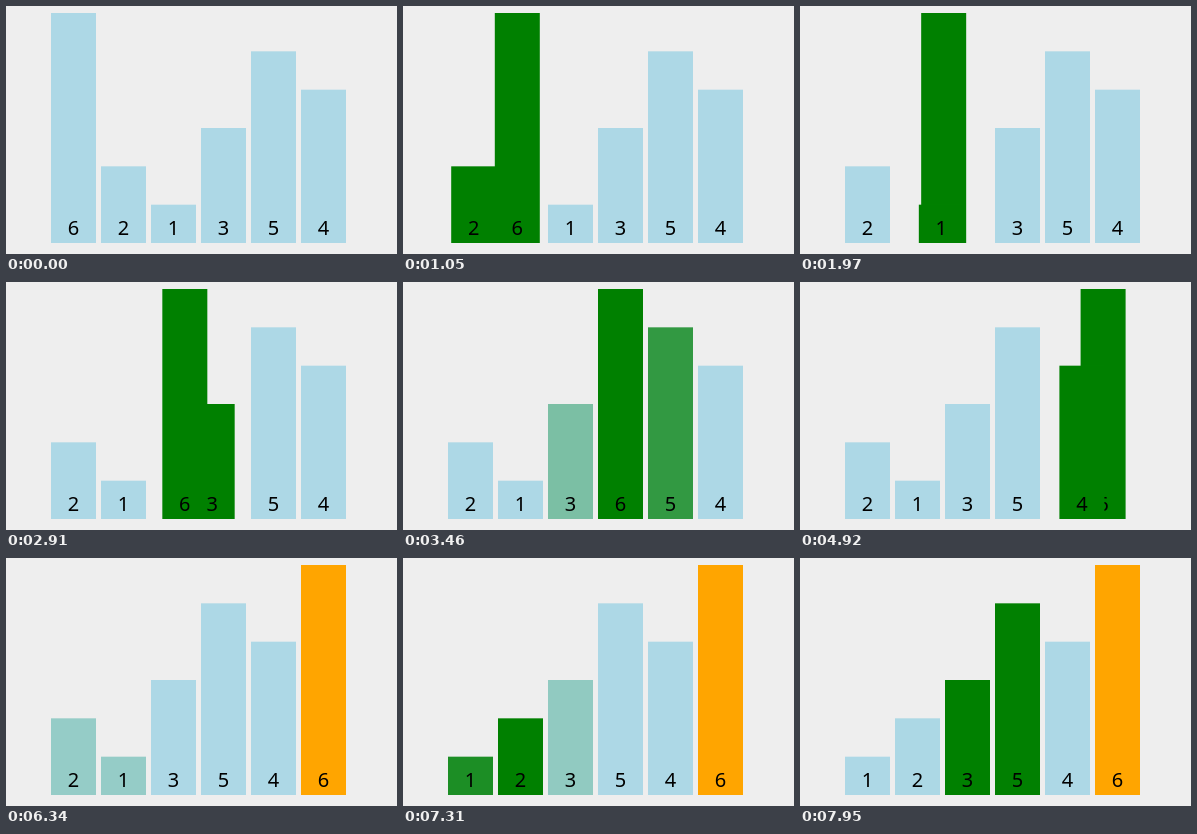
An HTML page that plays this animation: 391 px wide and 248 px high, repeating every 8000 ms.

```html
<!DOCTYPE html>
<html lang="en">
<head>
<meta charset="utf-8">
<title>Bubble sort</title>
<style>
  html, body { margin: 0; width: 100%; height: 100%; overflow: hidden; background: #eee; }
  svg { display: block; }
  text { font: 20px "Noto Sans", "Open Sans", sans-serif; text-anchor: middle; }
</style>
</head>
<body>
<svg width="391" height="248"></svg>
<script>
const LOOP = 8000, FADE = 250;
const BASE = 237, UNIT = 230 / 6, BAR_WIDTH = 45, PITCH = 50;
const IDLE = [173, 216, 230], ACTIVE = [0, 128, 0], SORTED = [255, 165, 0];

const svg = document.querySelector('svg');

function add(parent, tag, attributes) {
  const node = document.createElementNS('http://www.w3.org/2000/svg', tag);
  for (const name in attributes) node.setAttribute(name, attributes[name]);
  return parent.appendChild(node);
}

const slotX = slot => [45 + slot * PITCH];

const bars = [6, 2, 1, 3, 5, 4].map((value, slot) => {
  const group = add(svg, 'g');
  const height = value * UNIT;
  const rect = add(group, 'rect', { y: BASE - height, width: BAR_WIDTH, height });
  add(group, 'text', { x: BAR_WIDTH / 2, y: 229 }).textContent = value;
  return {
    group, rect,
    x: [{ time: -FADE, to: slotX(slot) }],
    color: [{ time: -FADE, to: IDLE }]
  };
});

// Build each bar's keys by running the sort; a step without a slot ends a pass.
const order = [...bars];
let sortedFrom = order.length;

function setColor(bar, time, to) {
  if (bar.color.at(-1).to !== to) bar.color.push({ time, to });
}

function step(time, slot, swapTime) {
  if (slot === undefined) sortedFrom--;
  order.forEach((bar, i) => {
    const active = i === slot || i === slot + 1;
    setColor(bar, time, i >= sortedFrom ? SORTED : active ? ACTIVE : IDLE);
  });
  if (swapTime === undefined) return;
  [order[slot], order[slot + 1]] = [order[slot + 1], order[slot]];
  for (const i of [slot, slot + 1]) order[i].x.push({ time: swapTime, to: slotX(i) });
}

step(370, 0, 864);
step(1354, 1, 1844);
step(2334, 2, 2815);
step(3315, 3, 3795);
step(4285, 4, 4775);
step(5265);
step(6260, 0, 6750);
step(7225, 1);
step(7725, 2);

function cubicInOut(p) {
  return p < 0.5 ? 4 * p ** 3 : 1 - 4 * (1 - p) ** 3;
}

function valueAt(keys, time) {
  let value = keys[0].to;
  for (const key of keys) {
    const p = cubicInOut(Math.min(1, Math.max(0, (time - key.time) / FADE)));
    value = value.map((v, i) => v + (key.to[i] - v) * p);
  }
  return value;
}

function draw(now) {
  const time = now % LOOP;
  for (const bar of bars) {
    bar.group.setAttribute('transform', `translate(${valueAt(bar.x, time)[0]})`);
    bar.rect.setAttribute('fill', `rgb(${valueAt(bar.color, time).map(Math.round)})`);
  }
}

const start = performance.now();
function frame() {
  draw(performance.now() - start);
  requestAnimationFrame(frame);
}
frame();
</script>
</body>
</html>
```
